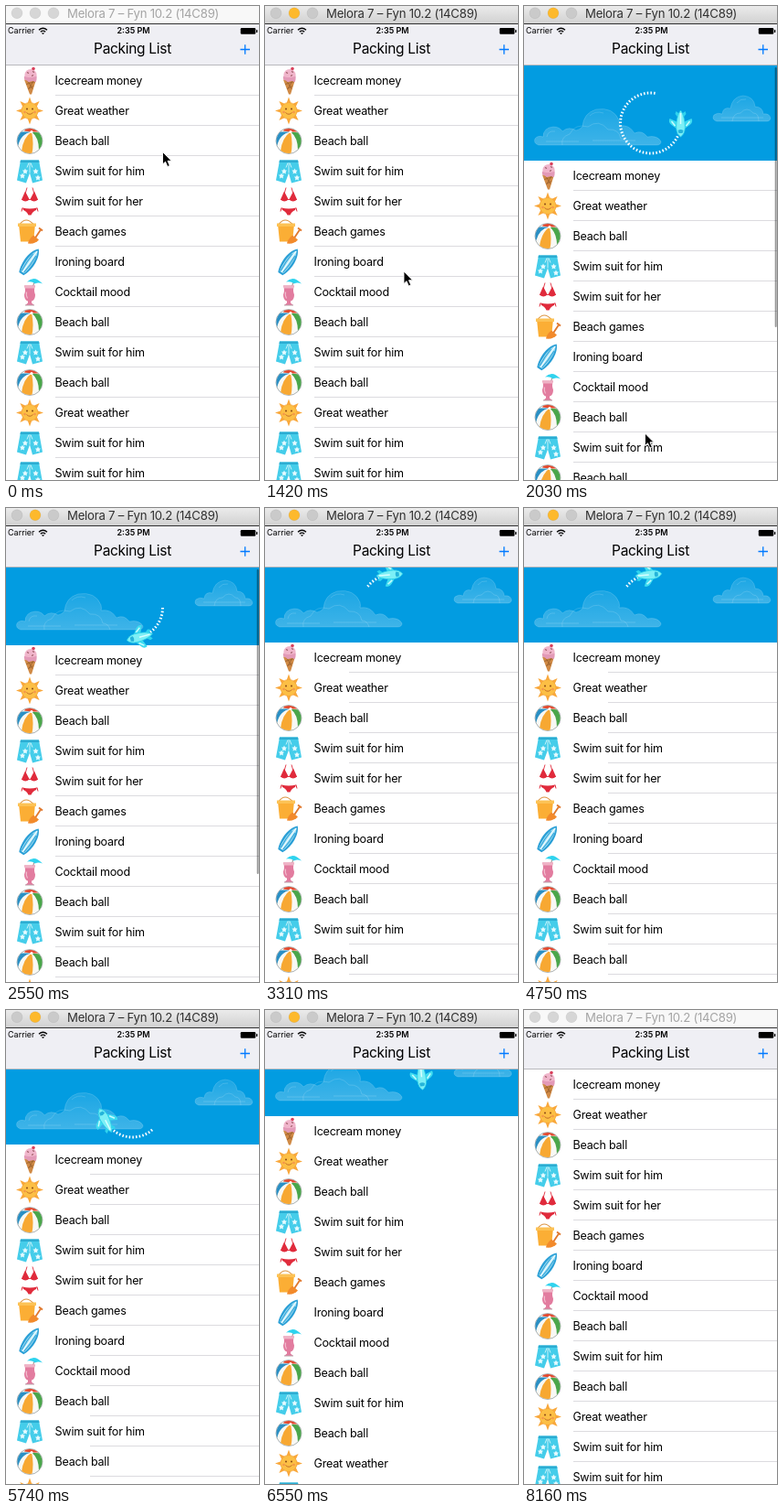
Recreate the animation shown at these times as an HTML page. Size 277 by 518 pixels, loop 8260 ms.

```html
<!DOCTYPE html>
<html lang="en">
<head>
<meta charset="utf-8">
<title>Packing List</title>
<style>
html, body { margin: 0; width: 100%; height: 100%; overflow: hidden; background: #fff; }
svg { display: block; width: 277px; height: 518px; }
text { font-family: Inter, Roboto, "Liberation Sans", sans-serif; fill: #000; }
.row { font-size: 12.6px; letter-spacing: -.25px; }
</style>
</head>
<body>
<svg viewBox="0 0 277 518" xmlns="http://www.w3.org/2000/svg">
<defs>
  <linearGradient id="chrome" x2="0" y2="1"><stop stop-color="#ebebeb"/><stop offset="1" stop-color="#d1d1d1"/></linearGradient>
  <linearGradient id="mist" x2="0" y2="1"><stop stop-color="#fff" stop-opacity=".1"/><stop offset="1" stop-color="#fff" stop-opacity=".24"/></linearGradient>
  <clipPath id="sky"><rect id="skyBox" y="65" width="277" height="0"/></clipPath>
  <clipPath id="ballClip"><circle r="13.6"/></clipPath>

  <g id="cone">
    <path d="M-6-1 0 15H2L7-1Z" fill="#d08a45"/>
    <path d="M-4 4 6 1M-2 9 4 6M-3-1 3 9M5-1-1 9" stroke="#99602c" stroke-width=".8"/>
    <circle cy="-6" cx="1" r="6.600" fill="#f0b5cb"/>
    <path d="M-6-5C-7 1-3-1-2 1S3-1 5 1 8-1 7.500-5C4-3-3-3-6-5Z" fill="#e39ab8"/>
    <circle cx="4" cy="-13" r="1.800" fill="#d9405c"/>
    <path d="M-3-9 -1-8M3-10 5-9M2-5 4-6" stroke="#9a5a62" stroke-width="1.100"/>
  </g>
  <g id="sun">
    <path id="rays" fill="#f9a83c"/>
    <circle r="9" fill="#fcbf45" stroke="#f5a53a" stroke-width=".8"/>
    <circle cx="-3" cy="-2" r="1" fill="#8a4b16"/><circle cx="3" cy="-2" r="1" fill="#8a4b16"/>
    <path d="M-3.500 2Q0 5.500 3.500 2" fill="none" stroke="#c4702a"/>
    <circle cx="-5.500" cy="1.500" r="1.300" fill="#f5964a"/><circle cx="5.500" cy="1.500" r="1.300" fill="#f5964a"/>
  </g>
  <g id="ball">
    <circle r="14" fill="#f8f8f4" stroke="#8c9396" stroke-width=".7"/>
    <g clip-path="url(#ballClip)">
      <path d="M2-10Q-10-8-13 6L-17 2V-8L-9-10Z" fill="#2a8fc4"/>
      <path d="M2-10Q-7-4-9 11L2 16Q5 3 2-10Z" fill="#f7a832"/>
      <path d="M2-10Q10-4 10 10L17 2 12-9Z" fill="#4aa64b"/>
      <path d="M2-10-6-11-4-15H7L9-10Z" fill="#e2492f"/>
    </g>
    <circle cx="2" cy="-10" r="1.600" fill="#fff"/>
  </g>
  <path id="flower" d="M0-3 1-1 3-1 1.600 1 2 3 0 2-2 3-1.600 1-3-1-1-1Z"/>
  <g id="trunks">
    <path d="M-10-12H10L14 10 3 13 0 2-4 13-14 10Z" fill="#45cdea"/>
    <path d="M-10-12H10L10.500-9.500H-10.500Z" fill="#2bacd2"/>
    <path d="M0-9 0 2M-1-9-3-4M1-9 3-4" stroke="#d4f6fc" stroke-width=".9" fill="none"/>
    <g fill="#e6fbff">
      <use href="#flower" x="-8" y="5"/><use href="#flower" x="6.500" y="0"/><use href="#flower" x="9" y="7"/><use href="#flower" x="-5" y="0"/>
    </g>
  </g>
  <g id="bikini" fill="#e02b3c">
    <path d="M-5-8-3-15M5-8 3-15M-9-2H9" stroke="#e02b3c" fill="none" stroke-width=".9"/>
    <path d="M-5-11-9-2Q-5 2-.3-2ZM5-11 9-2Q5 2 .3-2Z"/>
    <path d="M-8 7Q0 9 8 7L7 9.500Q3 11 1.500 15H-1.500Q-3 11-7 9.500Z"/>
    <path d="M-8 7-9 11M8 7 9 11" stroke="#e02b3c"/>
  </g>
  <g id="bucket">
    <path d="M-11-8Q-4-17 4-8" fill="none" stroke="#dc9442" stroke-width="1.200"/>
    <path d="M-12-8H6L4 11H-10Z" fill="#fbae35"/>
    <path d="M-13-9H7V-5.500H-13Z" fill="#fcc255"/>
    <path d="M12-2 6 7" stroke="#e0782c" stroke-width="1.800"/>
    <path d="M10-4 14-1" stroke="#e0782c" stroke-width="1.800"/>
    <path d="M4 4 10 9Q6 14-2 13Q-1 8 4 4Z" fill="#f28a2b"/>
  </g>
  <g id="board" transform="rotate(35)">
    <path d="M0-17C8-9 7 8 3 16H-3C-7 8-8-9 0-17Z" fill="#2a9fd6"/>
    <path d="M0-15C5-8 4.500 8 2 14H-2C-4.500 8-5-8 0-15Z" fill="#9cdcf2"/>
    <path d="M-2-9Q-3 3-1.500 13M2-9Q3 3 1.500 13" stroke="#2a9fd6" fill="none"/>
    <path d="M0-14V14" stroke="#f4fdff" stroke-width="1.200"/>
  </g>
  <g id="drink">
    <path d="M3-5 6-13" stroke="#9b8a8c"/>
    <path d="M-3-11Q5-19 14-9Q9-11 6-9Q2-12-3-11Z" fill="#2fd3ee"/>
    <path d="M-6-7H6Q4-2 6 3Q6 9 2 10V12L5 14.500H-5L-2 12V10Q-6 9-6 3Q-4-2-6-7Z" fill="#e27c9f"/>
    <path d="M-6-7H6L5-4H-5Z" fill="#efb3c6"/>
    <path d="M-3.500 0Q-4.500 4-2.500 7" fill="none" stroke="#f3bfd0" stroke-width="1.200"/>
    <path d="M-5 14.500H5" stroke="#b9a3aa"/>
  </g>
</defs>

<rect width="277" height="518" fill="#fff"/>
<g id="list">
  <rect id="press" y="131" width="277" height="33" fill="#d9d9d9"/>
  <path id="rules" stroke="#dcdbdf" fill="none"/>
</g>
<g clip-path="url(#sky)">
  <rect y="65" width="277" height="140" fill="#029ce1"/>
  <g id="clouds" fill="url(#mist)" stroke="#fff" stroke-opacity=".17" stroke-width=".9">
    <path d="M16-17Q10-19 12-24Q15-28 21-26Q21-36 32-37Q39-37 42-32Q49-38 57-33Q61-34 64-37Q65-52 79-56Q98-59 104-44Q105-40 104-38Q115-40 121-30Q129-34 135-26Q146-28 150-21Q150-17 145-17Z"/>
    <path d="M42-17Q40-26 50-29Q56-41 70-37Q82-46 92-34Q104-35 106-24Q112-24 114-17M25-26Q26-33 34-32M72-49Q78-55 87-52M24-21H60M75-22H122" fill="none"/>
    <path d="M211-43Q205-45 208-50Q212-53 217-51Q218-59 226-57Q228-70 240-71Q252-70 253-59Q261-59 262-51Q269-52 270-46Q269-43 266-43Z"/>
    <path d="M228-43Q229-52 237-52Q244-60 251-52Q257-52 257-43M233-63Q237-68 243-67M216-47H262" fill="none"/>
  </g>
</g>
<g id="flight">
  <path id="trail" fill="none" stroke="#fff" stroke-width="3" stroke-dasharray="1.500 2.200"/>
  <g id="plane">
    <path d="M0-9-5-13-6-10-2-5H2L6-10 5-13Z" fill="#2fd3ee"/>
    <path d="M-3 7-10 2Q-14-1-12-5L-3-1H3L12-5Q14-1 10 2L3 7Z" fill="#3fdcf0"/>
    <path d="M-10-2-6 3M10-2 6 3" stroke="#c9fbfd" stroke-width="1.500"/>
    <path d="M0-14C3-10 4.800-3 4.800 5Q4.500 12 0 15Q-4.500 12-4.800 5C-4.800-3-3-10 0-14Z" fill="#7ceff6" stroke="#28cfe9" stroke-width=".8"/>
    <path d="M0-11V1" stroke="#d8feff" stroke-width="1.500"/>
    <path d="M-3 8Q0 6 3 8L2 11H-2Z" fill="#25b4da"/>
  </g>
</g>
<rect id="thumb" x="274.700" y="67" width="2" rx="1" fill="#000"/>

<rect y="20" width="277" height="45" fill="#efeff4"/>
<path d="M0 64.500H277" stroke="#b9b9be"/>
<text x="2" y="30.300" font-size="9">Carrier</text>
<g fill="none" stroke="#000" stroke-width="1.300">
  <path d="M36 26.300Q40.500 22.300 45 26.300M37.800 28.300Q40.500 25.900 43.200 28.300"/><path d="M39.400 29.600 40.500 31 41.600 29.600Z" fill="#000" stroke-width=".4"/>
</g>
<text x="139.500" y="30.400" font-size="9" font-weight="600" text-anchor="middle">2:35 PM</text>
<rect x="256.800" y="24" width="16.500" height="6.800" rx="1.300"/><rect x="274" y="26" width="1.300" height="3" rx=".5"/>
<text x="138.500" y="52" font-size="15.500" letter-spacing="-.3" text-anchor="middle">Packing List</text>
<path d="M256.500 47.500H267M261.750 42.200V52.800" stroke="#007aff" stroke-width="1.300"/>

<rect id="bar" width="277" height="19"/>
<path d="M0 19.500H277" stroke="#333"/>
<g stroke-width=".6" stroke="#000" stroke-opacity=".1">
  <circle cx="12" cy="7.700" r="6" class="dot"/><circle cx="32" cy="7.700" r="6" class="dot"/><circle cx="52" cy="7.700" r="6" class="dot"/>
</g>
<text id="caption" x="67" y="13" font-size="13.200" letter-spacing="-.25">Melora 7 – Fyn 10.2 (14C89)</text>
<path id="cursor" d="M0 0V13.500L3 10.700 5.300 16 7.800 15 5.500 9.800H9.700Z" stroke="#fff" stroke-width=".9"/>
</svg>
<script>
const LOOP = 8260, TOP = 65, ROW = 33, INSET = 82;
const RELEASE = 2240, FLY = 2250, LAP = 1440, END = 6491, CLOSE = 280;
const CX = 138.5, R = 33;

const $ = id => document.getElementById(id);
const set = (el, attrs) => { for (const k in attrs) el.setAttribute(k, attrs[k]); };
const clamp = v => Math.min(1, Math.max(0, v));
const ramp = (t, a, b) => clamp((t - a) / (b - a));
const smooth = u => u * u * (3 - 2 * u);
const mix = (a, b, u) => a + (b - a) * u;

const kinds = {
  cone: 'Icecream money', sun: 'Great weather', ball: 'Beach ball', trunks: 'Swim suit for him',
  bikini: 'Swim suit for her', bucket: 'Beach games', board: 'Ironing board', drink: 'Cocktail mood'
};
const items = 'cone sun ball trunks bikini bucket board drink ball trunks ball sun trunks trunks'.split(' ');

$('list').insertAdjacentHTML('beforeend', items.map((kind, i) => {
  const y = TOP + ROW * i + 16;
  return `<use href="#${kind}" transform="translate(26 ${y + .5})"/><text class="row" x="53.5" y="${y + 4.7}">${kinds[kind]}</text>`;
}).join(''));

$('rays').setAttribute('d', 'M' + Array.from({ length: 16 }, (_, i) => {
  const a = i * Math.PI / 8, r = i % 2 ? 7.5 : 15;
  return `${r * Math.cos(a)} ${r * Math.sin(a)}`;
}).join('L') + 'Z');

// time, x, y of the pointer tip
const moves = [
  [0, 171.5, 159.5], [750, 171.5, 159.5], [1160, 152, 290], [1420, 152, 290],
  [1600, 136.5, 191.5], [1770, 136.5, 191.5], [2030, 132.5, 467], [2230, 131, 531]
];

function pointer(t) {
  const i = moves.findIndex(m => m[0] > t);
  if (i < 0) return moves.at(-1).slice(1);
  const [a, b] = [moves[i - 1], moves[i]];
  const u = smooth(ramp(t, a[0], b[0]));
  return [mix(a[1], b[1], u), mix(a[2], b[2], u)];
}

// rubber band resistance while dragging
const stretch = d => 498 * (1 - 1 / (1 + .477 * d / 498));

function pull(t) {
  if (t < 1770) return 0;
  if (t < RELEASE) return stretch(pointer(t)[1] - 191.5);
  if (t < END) return INSET + (stretch(339.5) - INSET) * Math.exp((RELEASE - t) / 118);
  return INSET * (1 - ramp(t, END, END + CLOSE)) ** 2;
}

function arc(cy, from, to) {
  const n = Math.max(2, Math.ceil((to - from) * 90));
  return 'M' + Array.from({ length: n + 1 }, (_, i) => {
    const a = 2 * Math.PI * mix(from, to, i / n);
    return `${(CX + R * Math.cos(a)).toFixed(2)} ${(cy + R * Math.sin(a)).toFixed(2)}`;
  }).join('L');
}

function drawFlight(t, off) {
  const cy = TOP + off - 41, flying = t >= FLY;
  const lap = flying ? (t - FLY) / LAP % 1 : 0;
  const tail = flying ? Math.max(0, 1.5 * lap - .5) : 0;
  const head = flying ? lap : t < 2030 ? .78 * ramp(t, 1790, 2030) : .78 + .22 * ramp(t, 2030, 2110);
  const a = 2 * Math.PI * lap;
  set($('flight'), { visibility: off > 0 ? 'visible' : 'hidden' });
  set($('trail'), { d: arc(cy, tail, head) });
  set($('plane'), {
    transform: `translate(${CX + R * Math.cos(a)} ${cy + R * Math.sin(a)}) rotate(${360 * lap})`,
    opacity: flying ? 1 : ramp(t, 1790, 2000)
  });
}

function drawList(t, off) {
  set($('list'), { transform: `translate(0 ${off})` });
  set($('press'), { opacity: t < 590 ? 0 : 1 - ramp(t, 600, 960) });
  const left = t < END ? mix(54, 92, smooth(ramp(t, 2610, 2850))) : 54;
  set($('rules'), {
    d: items.map((_, i) => `M${left} ${TOP + ROW * (i + 1) - .5}H277`).join(''),
    opacity: t >= END && t < END + CLOSE ? 0 : 1
  });
  const bottom = t < RELEASE ? 455 - off : mix(332, 400, smooth(ramp(t, RELEASE, 2530)));
  set($('thumb'), { height: bottom - 67, opacity: .4 * ramp(t, 1770, 1850) * (1 - ramp(t, 2610, 2860)) });
}

function drawChrome(t) {
  const active = t >= 450 && t < 8160;
  set($('bar'), { fill: active ? 'url(#chrome)' : '#f8f8f8' });
  $('caption').style.fill = active ? '#303030' : '#a4a4a4';
  document.querySelectorAll('.dot').forEach((dot, i) =>
    set(dot, { fill: !active ? '#d6d6d6' : i === 1 ? '#fdb92c' : '#cacaca' }));
  const [x, y] = pointer(t);
  set($('cursor'), { transform: `translate(${x} ${y})`, visibility: t < RELEASE ? 'visible' : 'hidden' });
}

function draw(t) {
  const off = Math.round(pull(t));
  set($('skyBox'), { height: off });
  set($('clouds'), { transform: `translate(0 ${TOP + off})` });
  drawList(t, off);
  drawFlight(t, off);
  drawChrome(t);
}

const start = performance.now();
function tick() {
  draw((performance.now() - start) % LOOP);
  requestAnimationFrame(tick);
}
tick();
</script>
</body>
</html>
```
